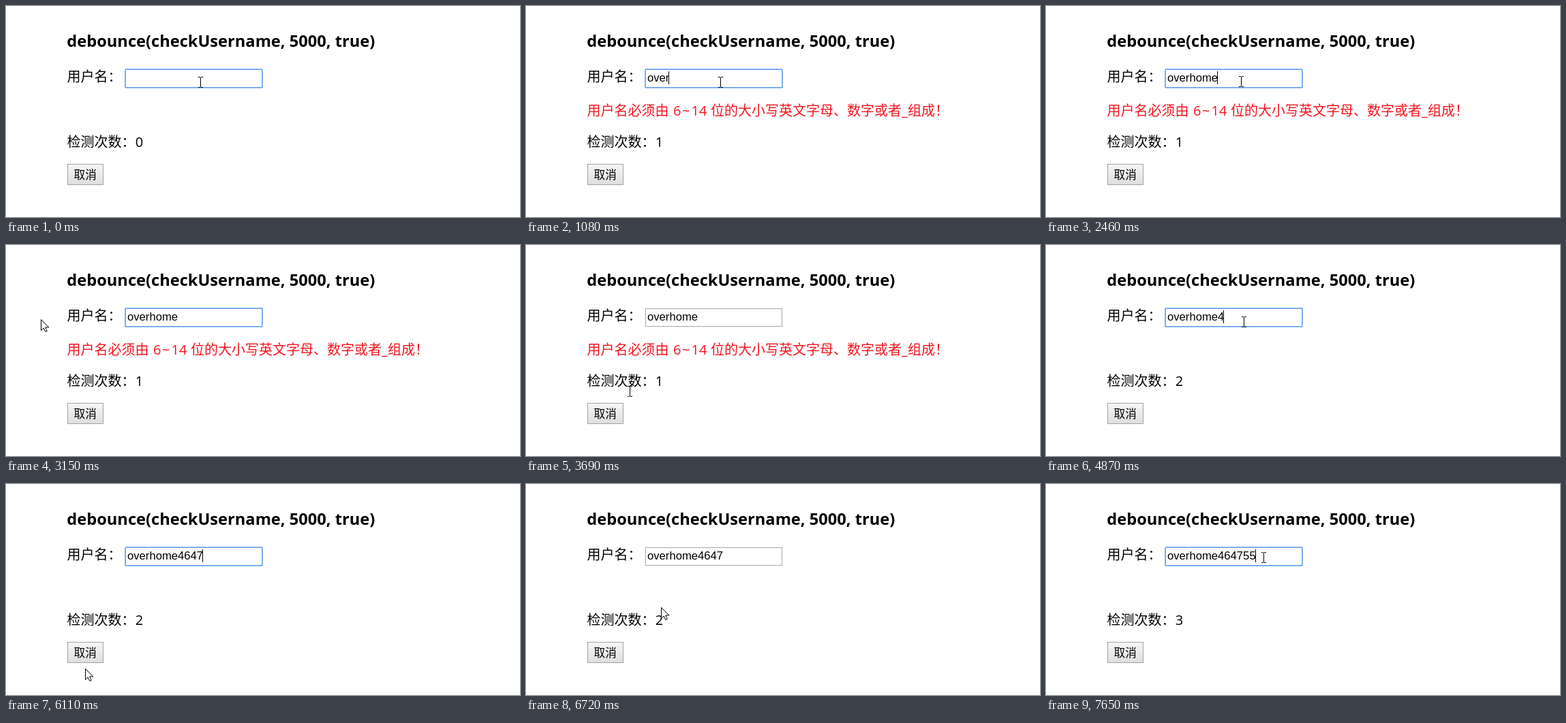
These frames come from a looping animation (754x310 px, 8000 ms). An HTML page:

```html
<!DOCTYPE html>
<html lang="zh-CN">
<head>
<meta charset="utf-8">
<title>debounce</title>
<style>
  html, body { margin: 0; width: 100%; height: 100%; overflow: hidden; background: #fff; }
  svg { display: block; width: 754px; height: 310px; }
  text { font: 500 20px "Open Sans", "Noto Sans", sans-serif; white-space: pre; }
  .cjk { font-family: "Noto Sans CJK SC", "Noto Sans CJK", sans-serif; font-weight: 350; }
  #title { font-weight: 700; font-size: 23.65px; }
  #error { fill: #f5141e; }
  #typed { font: 16.67px "Liberation Sans", Arial, sans-serif; }
  #label { font-size: 16.67px; }
</style>
</head>
<body>
<svg viewBox="0 0 754 310">
  <defs>
    <linearGradient id="up" x2="0" y2="1"><stop stop-color="#f6f6f6"/><stop offset="1" stop-color="#dedede"/></linearGradient>
    <linearGradient id="down" x2="0" y2="1"><stop stop-color="#e2e2e2"/><stop offset="1" stop-color="#d8d8d8"/></linearGradient>
  </defs>

  <text id="title" x="89.3" y="60.4">debounce(checkUsername, 5000, true)</text>
  <text class="cjk" x="89.5" y="111">用户名：</text>

  <rect x="175.5" y="93.5" width="200" height="26" fill="#fff" stroke="#a9a9a9"/>
  <g id="ring" fill="none">
    <rect x="174.5" y="92.5" width="202" height="28" rx="1.5" stroke="#8ab6f3"/>
    <rect x="175.5" y="93.5" width="200" height="26" stroke="#70a6ee"/>
  </g>
  <text id="typed" x="178" y="111"></text>
  <rect id="caret" y="96" width="1" height="19"/>

  <text id="error" y="161"><tspan class="cjk" x="89.5">用户名必须由</tspan><tspan x="216">6</tspan><tspan x="229">~</tspan><tspan x="242.5">14</tspan><tspan class="cjk" x="271">位的大小写英文字母、数字或者</tspan><tspan x="551">_</tspan><tspan class="cjk" x="560">组成！</tspan></text>

  <text y="207"><tspan class="cjk" x="89.5">检测次数：</tspan><tspan id="count" x="189.7">0</tspan></text>

  <rect id="button" x="90.5" y="232.5" width="52" height="30" stroke="#a2a2a2"/>
  <text id="label" class="cjk" x="116.2" y="254" text-anchor="middle">取消</text>

  <path id="beam" d="M-3-8h3v1h-3zM1-8h3v1h-3zM0-7h1v14h-1zM-3 7h3v1h-3zM1 7h3v1h-3z"/>
  <path id="arrow" d="M.5.5V16.5L4.2 13L6.8 18.5L9.2 17.4L6.7 12H11.8Z" fill="#fff" stroke="#000"/>
</svg>

<script>
const LOOP = 8000;
const STEP = 77; // pointer refresh interval
const $ = id => document.getElementById(id);
const show = (id, on) => $(id).setAttribute('visibility', on ? 'visible' : 'hidden');
const within = (t, ...spans) => spans.some(([a, b]) => t >= a && t < b);

// Typing bursts: each starts at a time and adds keys at a steady gap
const entry = 'overhome464755';
const burst = (start, gap, keys) => t =>
  Math.max(0, Math.min(keys, Math.floor((t - start) / gap) + 1));
const bursts = [
  burst(150, 1, 1), burst(620, 230, 3), burst(1460, 153, 4),
  burst(4870, 150, 3), burst(5250, 1, 1), burst(7350, 300, 2)
];
const typedCount = t => bursts.reduce((sum, keys) => sum + keys(t), 0);

// Pointer sweeps: each follows a Bezier curve through its control points
const sweep = (start, end, ...points) => ({ start, end, points });
const sweeps = [
  sweep(0, 0, [285, 112]),
  sweep(2460, 2460, [286, 111]),
  sweep(2690, 3460, [268, 104], [100, 0], [-45, 110], [115, 256]),
  sweep(3690, 4150, [152, 215], [230, 130], [280, 108]),
  sweep(4320, 4320, [297, 117]),
  sweep(4870, 4870, [290, 113]),
  sweep(5710, 6110, [310, 125], [690, 150], [510, 290], [116, 271]),
  sweep(6180, 6340, [113, 258], [112, 253]),
  sweep(6490, 7030, [114, 254], [150, 215], [280, 110], [319, 108])
];

function bezier(points, u) {
  while (points.length > 1)
    points = points.slice(1).map(([x, y], i) => {
      const [px, py] = points[i];
      return [px + (x - px) * u, py + (y - py) * u];
    });
  return points[0].map(Math.round);
}

function pointerAt(t) {
  const { start, end, points } = sweeps.filter(s => t >= s.start).pop();
  const steps = Math.round((end - start) / STEP) || 1;
  const k = Math.floor((t - start) / (end - start || 1) * steps + 0.05);
  return bezier(points, Math.min(1, k / steps));
}

const inBox = (x, y, l, t, r, b) => x >= l && x <= r && y >= t && y <= b;

function overText(x, y, hasError) {
  return inBox(x, y, 175, 93, 376, 120) || inBox(x, y, 90, 38, 542, 68) ||
    inBox(x, y, 90, 92, 170, 118) || inBox(x, y, 90, 187, 201, 216) ||
    hasError && inBox(x, y, 90, 141, 607, 168);
}

function draw(t) {
  const hasError = within(t, [220, 4870]);
  show('error', hasError);
  show('ring', !within(t, [3385, 4150], [6340, 7030]));
  $('count').textContent = [220, 4870, 7350].filter(x => t >= x).length;

  const typed = $('typed');
  typed.textContent = entry.slice(0, typedCount(t));
  show('caret', within(t, [150, 2540], [4150, 4620], [4870, 5410], [5870, 6340], [7030, LOOP]));
  $('caret').setAttribute('x', Math.floor(177.5 + typed.getComputedTextLength()));

  const pressed = within(t, [3385, 3460], [6340, 6490]);
  $('button').setAttribute('fill', pressed ? 'url(#down)' : 'url(#up)');

  const [x, y] = pointerAt(t);
  const beam = overText(x, y, hasError);
  show('beam', beam);
  show('arrow', !beam);
  $(beam ? 'beam' : 'arrow').setAttribute('transform', `translate(${x} ${y})`);
}

const start = performance.now();
function tick() {
  draw((performance.now() - start) % LOOP);
  requestAnimationFrame(tick);
}
draw(0);
requestAnimationFrame(tick);
</script>
</body>
</html>
```
